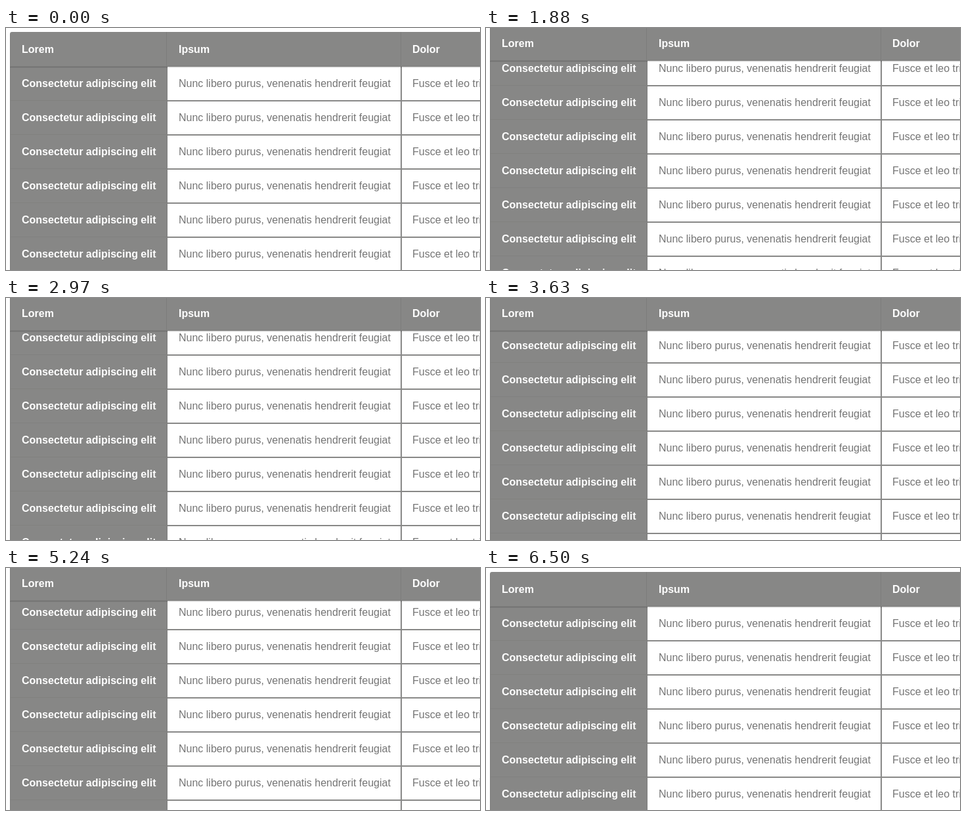
These frames come from a looping animation (722x369 px, 8.75 s). An HTML page with a canvas:

```html
<!DOCTYPE html>
<html lang="en">
<head>
<meta charset="utf-8">
<title>Sticky table header</title>
<style>
html, body { margin: 0; width: 100%; height: 100%; overflow: hidden; background: #fff; }
canvas { display: block; }
</style>
</head>
<body>
<canvas id="stage" width="722" height="369"></canvas>
<script>
const W = 722, H = 369, LOOP = 8750, STEP = 69;
const ROW = 52, HEAD_TOP = 6, HEAD_H = 53, PIN = -3;
const GRAY = '#878786', EDGE = '#7d7d7c', SEAM = '#81817f', RULE = '#888887';
const FONT = '16px "Liberation Sans", Arial, sans-serif';
const COLS = [
  { x: 24, head: 'Lorem', cell: 'Consectetur adipiscing elit' },
  { x: 263, head: 'Ipsum', cell: 'Nunc libero purus, venenatis hendrerit feugiat' },
  { x: 619, head: 'Dolor', cell: 'Fusce et leo tristique, in mollis' }
];

// [time in ms, scroll in px]
const KEYS = [
  [0, 0], [1260, 0], [1880, 231], [2440, 400],
  [2700, 400], [2970, 440], [3440, 587],
  [3560, 587], [4100, 477], [4380, 430],
  [4830, 430], [5240, 329], [5800, 187],
  [5990, 187], [6500, 0], [LOOP, 0]
];

const ctx = document.getElementById('stage').getContext('2d');

function rate(i) {
  return (KEYS[i + 1][1] - KEYS[i][1]) / (KEYS[i + 1][0] - KEYS[i][0]);
}

// Harmonic mean keeps the curve monotone and flat at rests.
function slope(i) {
  if (i === 0 || i === KEYS.length - 1) return 0;
  const a = rate(i - 1), b = rate(i);
  return a * b > 0 ? 2 * a * b / (a + b) : 0;
}

function scrollAt(t) {
  let i = 0;
  while (t >= KEYS[i + 1][0]) i++;
  const [t0, y0] = KEYS[i], [t1, y1] = KEYS[i + 1];
  const span = t1 - t0, n = Math.round(span / STEP);
  const u = Math.floor((t - t0) / span * n) / n, v = 1 - u;
  return Math.round(
    y0 * v * v * (1 + 2 * u) + y1 * u * u * (3 - 2 * u) +
    span * u * v * (slope(i) * v - slope(i + 1) * u)
  );
}

function rect(color, x, y, w, h) {
  ctx.fillStyle = color;
  ctx.fillRect(x, y, w, h);
}

function text(str, x, y, color, bold) {
  ctx.font = (bold ? 'bold ' : '') + FONT;
  ctx.fillStyle = color;
  ctx.fillText(str, x, y);
}

function drawRow(y) {
  rect(SEAM, 7, y + ROW - 1, 238, 1);
  rect(RULE, 246, y + ROW - 1, W - 246, 2);
  COLS.forEach((c, i) => text(c.cell, c.x, y + 31, i ? '#757575' : '#fff', !i));
}

function drawHead(y) {
  const bottom = y + HEAD_H;
  rect('rgba(0,0,0,.16)', HEAD_TOP, bottom, W, 1);
  rect('rgba(0,0,0,.06)', HEAD_TOP, bottom + 1, W, 1);
  ctx.fillStyle = GRAY;
  ctx.beginPath();
  ctx.roundRect(6, y, W, HEAD_H, [3, 0, 0, 0]);
  ctx.fill();
  rect(EDGE, 6, bottom - 1, W, 1);
  rect(EDGE, 6, y + 3, 1, HEAD_H - 3);
  rect(EDGE, 244, y, 1, HEAD_H);
  rect(EDGE, 601, y, 1, HEAD_H);
  for (const c of COLS) text(c.head, c.x, y + 32, '#fff', true);
}

function draw(t) {
  const s = scrollAt(t);
  rect('#fff', 0, 0, W, H);
  rect(GRAY, 6, HEAD_TOP + 3, 240, H);
  rect(EDGE, 6, HEAD_TOP + 3, 1, H);
  rect(EDGE, 245, HEAD_TOP + 3, 1, H);
  rect(RULE, 601, HEAD_TOP + 3, 2, H);
  const first = Math.max(0, Math.floor(s / ROW) - 1);
  for (let r = first; r < first + 10; r++) drawRow(HEAD_TOP + HEAD_H + r * ROW - s);
  drawHead(Math.max(PIN, HEAD_TOP - s));
}

const start = performance.now();
function tick() {
  draw((performance.now() - start) % LOOP);
  requestAnimationFrame(tick);
}
tick();
</script>
</body>
</html>
```
